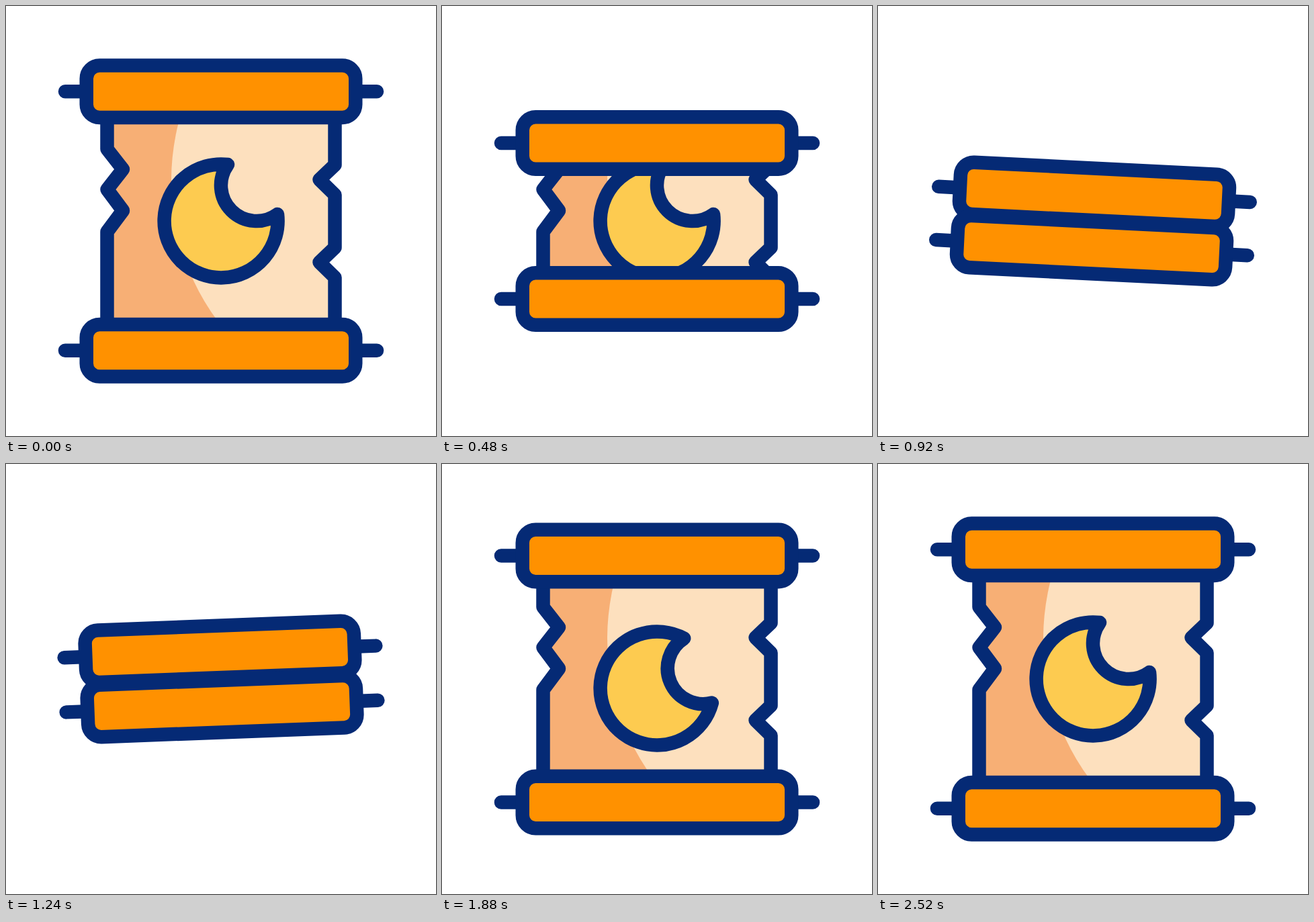
These frames come from a looping animation (640x640 px, 2800 ms). An HTML page:

```html
<!DOCTYPE html>
<html lang="en">
<head>
<meta charset="utf-8">
<title>Moon scroll</title>
<style>
  html, body { margin: 0; width: 100%; height: 100%; overflow: hidden; background: #fff; }
  svg { display: block; width: 100%; height: 100%; }
  .line { fill: none; stroke: #052a75; stroke-width: 20.5; stroke-linecap: round; stroke-linejoin: round; }
</style>
</head>
<body>
<svg viewBox="0 0 640 640">
  <defs>
    <clipPath id="gap"><rect id="window" x="100" width="440"/></clipPath>
    <clipPath id="sheet"><path id="outline"/></clipPath>
    <g id="rod">
      <path class="line" d="M88 0H120M520 0H552"/>
      <rect class="line" x="119.75" y="-38.75" width="400.5" height="77.5" rx="19.5" style="fill:#ff9100"/>
    </g>
  </defs>
  <g id="scroll">
    <g clip-path="url(#gap)">
      <g clip-path="url(#sheet)">
        <rect x="100" y="100" width="440" height="440" fill="#f7af75"/>
        <circle cx="597" cy="260" r="351" fill="#fde0be"/>
      </g>
      <path id="edges" class="line"/>
      <path id="moon" class="line" style="fill:#fdcb50"
        d="M10-84A84.5 84.5 0 1 0 84-10A53 53 0 0 1 10-84Z"/>
    </g>
    <use id="top" href="#rod"/>
    <use id="bottom" href="#rod"/>
  </g>
</svg>
<script>
  const LOOP = 2800, STEP = 40;
  const OPEN = 192.75, SHUT = 39.4;   // distance of each rod from the middle
  const el = id => document.getElementById(id);
  const set = (id, name, value) => el(id).setAttribute(name, value);

  const left = '150.5 120 150.5 213 174 243 150.5 273 174 304.5 150.5 336 150.5 520';
  const right = '489.5 520 489.5 404 466.5 381.5 489.5 359.5 489.5 281 466.5 258.5 489.5 236.5 489.5 120';
  set('outline', 'd', `M${left} L${right}Z`);
  set('edges', 'd', `M${left}M${right}`);

  // cubic-bezier(.59, 0, .41, 1), solved by bisection
  function ease(x) {
    let lo = 0, hi = 1;
    for (let i = 0; i < 24; i++) {
      const s = (lo + hi) / 2, q = 1 - s;
      if (1.77 * s * q * q + 1.23 * s * s * q + s * s * s < x) lo = s; else hi = s;
    }
    return lo * lo * (3 - 2 * lo);
  }

  // value at time t along [time, value] keys
  function track(t, keys) {
    if (t <= keys[0][0]) return keys[0][1];
    for (let i = 1; i < keys.length; i++) {
      const [t0, v0] = keys[i - 1], [t1, v1] = keys[i];
      if (t < t1) return v0 + (v1 - v0) * ease((t - t0) / (t1 - t0));
    }
    return keys[keys.length - 1][1];
  }

  const reach = [[0, OPEN], [960, SHUT], [1160, SHUT], [2080, OPEN]];
  const tilt = [[760, 0], [960, 3], [1160, -3], [1360, 0]];
  const spin = [[960, 0], [1480, -25], [2000, 25], [2520, 0]];
  const drop = [[1280, 0], [1760, 14.4], [2520, 0]];

  function draw(t) {
    const r = track(t, reach);
    set('top', 'transform', `translate(0 ${320 - r})`);
    set('bottom', 'transform', `translate(0 ${320 + r})`);
    set('window', 'y', 320 - r);
    set('window', 'height', 2 * r);
    set('scroll', 'transform', `rotate(${track(t, tilt)} 320 320)`);
    set('moon', 'transform', `translate(320 ${320 + track(t, drop)}) rotate(${track(t, spin)})`);
  }

  const start = performance.now();
  function tick() {
    const t = (performance.now() - start) % LOOP;
    draw(Math.floor(t / STEP) * STEP);
    requestAnimationFrame(tick);
  }
  tick();
</script>
</body>
</html>
```
